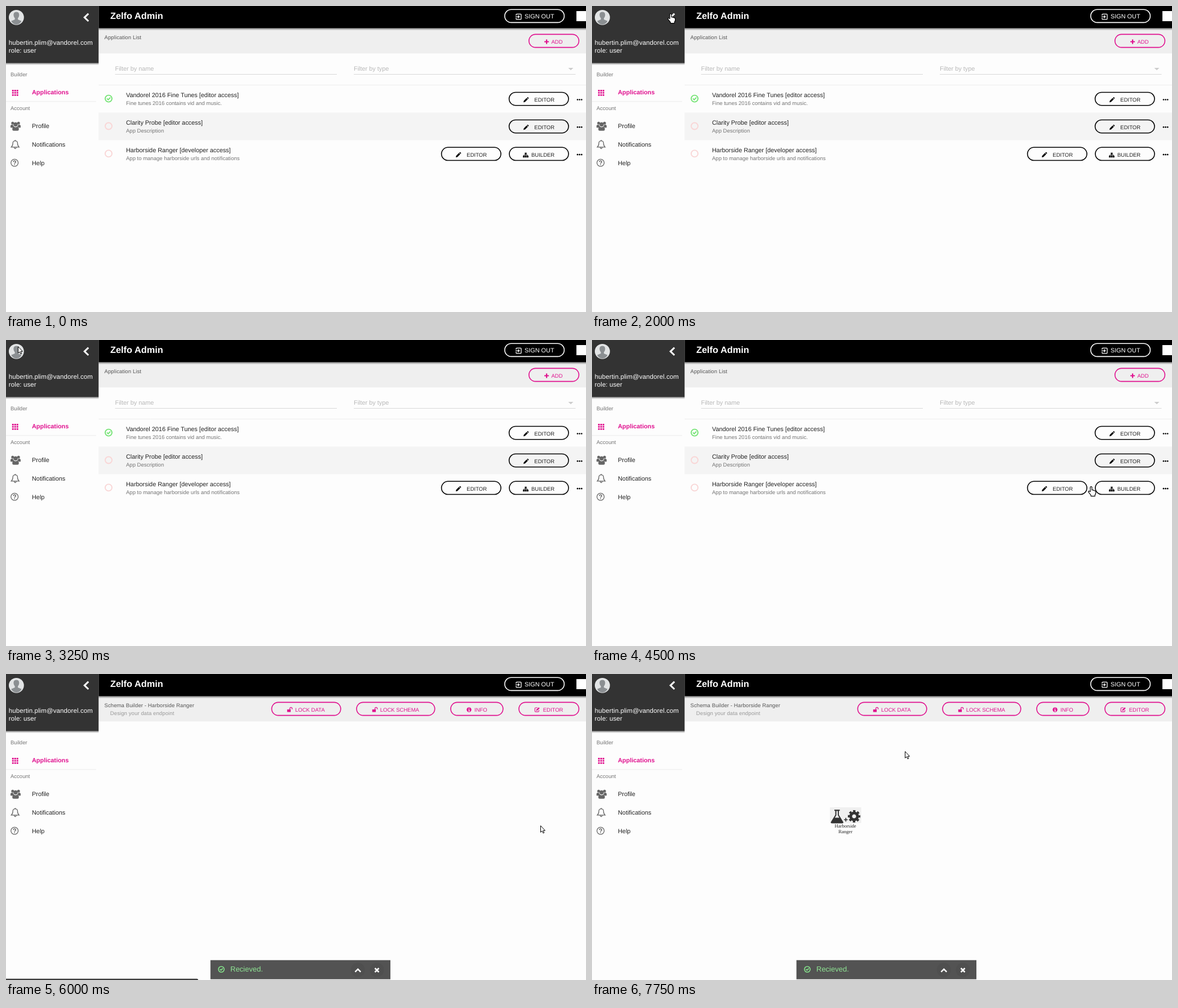
Animation of 1029x544 px, one loop 8000 ms. Source, as an HTML page:

```html
<!DOCTYPE html>
<html lang="en">
<head>
<meta charset="utf-8">
<title>Zelfo Admin</title>
<style>
html, body { margin: 0; width: 100%; height: 100%; overflow: hidden; background: #fdfdfd; }
svg { display: block; }
text { font-family: "Liberation Sans", Arial, sans-serif; font-size: 10.88px; fill: #222; text-rendering: geometricPrecision; }
.small { font-size: 9.52px; }
.spaced { letter-spacing: .1px; }
.muted { fill: #757575; }
.hint { fill: #b8b8b8; }
.bold { font-weight: bold; }
.pink text, text.pink { fill: #e0118f; }
.pill { fill: none; stroke: #000; stroke-width: 1.6; }
.pink .pill { stroke: #e0118f; }
.pink .ico { fill: #e0118f; }
.line { fill: none; stroke: currentColor; }

/* one step is 250 ms = 3.125% */
.t { animation: 8s step-end -15ms infinite; }
.open { animation-name: open; }
.shut { animation-name: shut; }
.title { animation-name: title; }
.shift { animation-name: shift; }
.list { animation-name: list; }
.schema { animation-name: schema; }
.node { animation-name: node; }
.status { animation-name: status; }
.ripple1 { animation-name: ripple1; }
.ripple2 { animation-name: ripple2; }
.cursor { animation-name: cursor; }
.hand { animation-name: hand; }
.arrow { animation-name: arrow; }

@keyframes open { 0%, 40.625%, 100% { opacity: 1 } 28.125% { opacity: 0 } }
@keyframes shut { 0%, 40.625%, 100% { opacity: 0 } 28.125% { opacity: 1 } }
@keyframes title { 0%, 40.625%, 100% { transform: none } 28.125% { transform: translateX(-154px) } }
@keyframes shift { 0%, 40.625%, 100% { transform: none } 28.125% { transform: translateX(-170.4px) } }
@keyframes list { 0%, 100% { opacity: 1 } 75% { opacity: 0 } }
@keyframes schema { 0%, 100% { opacity: 0 } 75% { opacity: 1 } }
@keyframes node { 0%, 100% { opacity: 0 } 78.125% { opacity: 1 } }
@keyframes status { 0%, 21.875%, 81.25%, 100% { opacity: 0 } 12.5%, 59.375% { opacity: 1 } }
@keyframes ripple1 {
  0%, 21.875%, 100% { transform: scale(0) }
  15.625% { transform: scale(.2) }
  18.75% { transform: scale(1) }
}
@keyframes ripple2 {
  0%, 75%, 100% { transform: scale(0) }
  68.75% { transform: scale(.21) }
  71.875% { transform: scale(1) }
}
@keyframes hand {
  0%, 21.875%, 31.25%, 40.625%, 75%, 100% { opacity: 0 }
  12.5%, 25%, 37.5%, 56.25% { opacity: 1 }
}
@keyframes arrow {
  0%, 12.5%, 25%, 37.5%, 56.25%, 100% { opacity: 0 }
  3.125%, 21.875%, 31.25%, 40.625%, 75% { opacity: 1 }
}
@keyframes cursor {
  0%, 3.125% { transform: translate(419px, 504px) }
  6.25% { transform: translate(194px, 266px) }
  9.375% { transform: translate(110px, 182px) }
  12.5% { transform: translate(68px, 144px) }
  21.875% { transform: translate(108px, 80px) }
  25% { transform: translate(138px, 13px) }
  34.375% { transform: translate(70px, 14px) }
  37.5% { transform: translate(21px, 11px) }
  46.875% { transform: translate(380px, 172px) }
  50% { transform: translate(547px, 238px) }
  53.125% { transform: translate(717px, 256px) }
  56.25% { transform: translate(884px, 260px) }
  59.375% { transform: translate(841px, 262px) }
  62.5% { transform: translate(951px, 268px) }
  75% { transform: translate(948px, 269px) }
  84.375% { transform: translate(930px, 240px) }
  87.5% { transform: translate(850px, 190px) }
  90.625% { transform: translate(740px, 160px) }
  93.75% { transform: translate(630px, 145px) }
  96.875%, 100% { transform: translate(555px, 137px) }
}
</style>
</head>
<body>
<svg width="1029" height="544" viewBox="0 0 1029 544">
<defs>
  <linearGradient id="shade" x2="0" y2="1">
    <stop offset="0" stop-color="#000" stop-opacity=".42"/>
    <stop offset="1" stop-color="#000" stop-opacity="0"/>
  </linearGradient>
  <clipPath id="navClip"><rect y="138" width="164" height="32.5"/></clipPath>
  <clipPath id="btnClip"><rect x="893" y="251" width="105" height="24" rx="12"/></clipPath>
  <g id="pencil"><path d="M-4.3 4.3l.7-2.9L1.3-3.5 3.5-1.3-1.4 3.6zM1.9-4.1l.8-.7q.6-.4 1.1.1l1 1q.5.6 0 1.1l-.7.7z"/></g>
  <g id="editor">
    <rect class="pill" x=".8" y=".8" width="105.4" height="23.2" rx="11.6"/>
    <use href="#pencil" x="30.5" y="14.3"/>
    <text class="small" x="45.5" y="17.3">EDITOR</text>
  </g>
  <g id="dots"><circle cx="-3.6" r="1.35"/><circle r="1.35"/><circle cx="3.6" r="1.35"/></g>
  <g id="check" fill="none" stroke="currentColor" stroke-width="1.9">
    <circle r="6"/><path d="M-3-.2L-.7 2 3.2-2"/>
  </g>
  <g id="unlock">
    <path d="M-4.5-.5h6.3v4.6h-6.3z"/>
    <path d="M.3-.5v-1.6a2 2 0 0 1 4 0v1.4" fill="none" stroke="#e0118f" stroke-width="1.3"/>
  </g>
  <path id="caret" d="M-4.5-2h9L0 2.3z" fill="#ccc"/>
</defs>

<rect width="1029" height="544" fill="#fdfdfd"/>
<rect y="39" width="1029" height="45.3" fill="#efefef"/>

<!-- application list -->
<g class="t list">
  <g class="t shift"><text class="small spaced" x="174.5" y="58.5" style="fill:#555">Application List</text></g>
  <g class="pink">
    <rect class="pill" x="927.8" y="50.4" width="88.6" height="23.2" rx="11.6"/>
    <path class="ico" d="M958 59.5h2.2v2.9h2.9v2.2h-2.9v2.9H958v-2.9h-2.9v-2.2h2.9z"/>
    <text class="small" x="967.5" y="66.6">ADD</text>
  </g>

  <g class="t open">
    <text class="hint" x="193.5" y="115">Filter by name</text>
    <text class="hint" x="617" y="115">Filter by type</text>
    <path d="M193.5 121.5H587M617 121.5h393.5" stroke="#d8d8d8"/>
    <use href="#caret" x="1002" y="112"/>
  </g>
  <g class="t shut" opacity="0">
    <text class="hint" x="29" y="115">Filter by name</text>
    <text class="hint" x="534.5" y="115">Filter by type</text>
    <path d="M29 121.5h471.5M534.5 121.5h472" stroke="#d8d8d8"/>
    <use href="#caret" x="996.5" y="112"/>
  </g>

  <path d="M0 140.5h1029" stroke="#ececec"/>
  <rect y="189.5" width="1029" height="49" fill="#f4f4f4"/>

  <g class="t shift">
    <use href="#check" x="182" y="164.6" color="#74e374"/>
    <g fill="none" stroke="#f9d6d6" stroke-width="1.9">
      <circle cx="182" cy="213.5" r="6"/><circle cx="182" cy="262.4" r="6"/>
    </g>
    <text x="213" y="162.3">Vandorel 2016 Fine Tunes [editor access]</text>
    <text class="small muted" x="213" y="176">Fine tunes 2016 contains vid and music.</text>
    <text x="213" y="211.3">Clarity Probe [editor access]</text>
    <text class="small muted" x="213" y="225">App Description</text>
    <text x="213" y="260.3">Harborside Ranger [developer access]</text>
    <text class="small muted" x="213" y="274">App to manage harborside urls and notifications</text>
  </g>

  <g clip-path="url(#btnClip)">
    <g transform="translate(948 270.5)"><circle class="t ripple2" r="43" fill="#cfcfcf" transform="scale(0)"/></g>
  </g>
  <use href="#editor" x="891.8" y="152.7"/>
  <use href="#editor" x="891.8" y="201.7"/>
  <use href="#editor" x="771.8" y="250.5"/>
  <rect class="pill" x="893" y="251.3" width="105" height="23.2" rx="11.6"/>
  <g transform="translate(922 265)">
    <path d="M-1.6-4.3h3.2v3h-3.2zM-4.9 1.2h3v3h-3zM-1.5 1.2h3v3h-3zM1.9 1.2h3v3h-3z"/>
    <path d="M0-2v3.4M-3.4 1.5V0h6.8v1.5" fill="none" stroke="#000" stroke-width=".9"/>
  </g>
  <text class="small" x="932" y="267.8">BUILDER</text>
  <use href="#dots" x="1017.6" y="166.5"/>
  <use href="#dots" x="1017.6" y="215.3"/>
  <use href="#dots" x="1017.6" y="264.2"/>
</g>

<!-- schema builder -->
<g class="t schema" opacity="0">
  <text class="small spaced" x="174.5" y="58.7" style="fill:#555">Schema Builder - Harborside Ranger</text>
  <text class="small spaced" x="184.8" y="73" style="fill:#999">Design your data endpoint</text>
  <g class="pink">
    <rect class="pill" x="471.4" y="50.4" width="122.4" height="23.2" rx="11.6"/>
    <rect class="pill" x="622" y="50.4" width="138.7" height="23.2" rx="11.6"/>
    <rect class="pill" x="789" y="50.4" width="92.8" height="23.2" rx="11.6"/>
    <rect class="pill" x="910" y="50.4" width="106.4" height="23.2" rx="11.6"/>
    <use class="ico" href="#unlock" x="503.3" y="63.5"/>
    <use class="ico" href="#unlock" x="654.3" y="63.5"/>
    <circle class="ico" cx="821.5" cy="63.5" r="4.2"/>
    <path d="M820.6 61h1.8M820.3 63.2h1.4v2.6M820.2 66h2.8" fill="none" stroke="#fff" stroke-width="1.1"/>
    <path d="M943 60h-3.3q-1.4 0-1.4 1.4v4.3q0 1.4 1.4 1.4h4.3q1.4 0 1.4-1.4V64" fill="none" stroke="#e0118f" stroke-width="1.1"/>
    <path class="ico" d="M940.5 65.3l.5-2 4.1-4.1 1.7 1.7-4.2 4.1z"/>
    <text class="small" x="513" y="66.6">LOCK DATA</text>
    <text class="small" x="663.7" y="66.6">LOCK SCHEMA</text>
    <text class="small" x="831" y="66.6">INFO</text>
    <text class="small" x="952.7" y="66.6">EDITOR</text>
  </g>

  <g class="t node" opacity="0">
    <rect x="422" y="237" width="55.5" height="28" fill="#f0f0f0"/>
    <path d="M430 241.2h9.6v2H438v7.2l7.4 12q1.6 3-1.6 3h-18q-3.2 0-1.6-3l7.4-12v-7.2H430z" fill="#333"/>
    <path d="M433.6 243.4h2.5v7.6l2.8 4.6h-8.1l2.8-4.6z" fill="#f0f0f0"/>
    <path d="M447 259h6.6M450.3 255.7v6.6" stroke="#333" stroke-width="1.7"/>
    <g fill="none" stroke="#333" transform="translate(465 253)">
      <circle r="6.1" stroke-width="5"/>
      <circle r="9.3" stroke-width="3.6" stroke-dasharray="4.1 3.204" stroke-dashoffset="2.05"/>
    </g>
    <g text-anchor="middle">
      <text x="449.6" y="273.3" style="font:8.6px 'Liberation Serif',serif">Harborside</text>
      <text x="449.6" y="283.3" style="font:8.6px 'Liberation Serif',serif">Ranger</text>
    </g>
  </g>

  <rect x="362.7" y="508.7" width="319.3" height="34" fill="#535353"/>
  <g transform="translate(382 525) scale(.84)"><use href="#check" color="#86e58c"/></g>
  <text x="398" y="529.3" style="font-size:13px;fill:#8fe594">Recieved.</text>
  <circle cx="624.3" cy="526" r="12.5" fill="#4f4f4f"/>
  <circle cx="658" cy="526" r="12.5" fill="#4f4f4f"/>
  <path d="M619.4 529.6l4.9-4.9 4.9 4.9M654.5 523l7 7M661.5 523l-7 7" fill="none" stroke="#fff" stroke-width="2.5"/>
</g>

<!-- top bar -->
<rect width="1029" height="39.5" fill="#000"/>
<rect y="39.5" width="1029" height="4" fill="url(#shade)"/>
<g class="t title"><text class="bold" x="185" y="23.3" style="font-size:16.32px;fill:#fff">Zelfo Admin</text></g>
<g class="t shut" opacity="0"><path d="M6 12.7h16M6 18.3h16M6 23.9h16" stroke="#fff" stroke-width="2.3"/></g>
<rect x="884.8" y="6.2" width="105.6" height="23.2" rx="11.6" fill="none" stroke="#fff" stroke-width="1.6"/>
<path d="M905 17v-1.6q0-1 1-1h7q1 0 1 1v7.4q0 1-1 1h-7q-1 0-1-1V21M903.8 19.1h6.5M908.2 16.6l2.5 2.5-2.5 2.5" fill="none" stroke="#fff" stroke-width="1.3"/>
<text x="920" y="22.4" style="fill:#fff">SIGN OUT</text>
<rect x="1012" y="9" width="17" height="18" fill="#fff"/>

<!-- sidebar -->
<g class="t open">
  <rect width="164.3" height="544" fill="#fdfdfd"/>
  <rect width="164.3" height="101.5" fill="#333"/>
  <rect y="101.5" width="164.3" height="3.5" fill="url(#shade)"/>
  <circle cx="18.4" cy="20.3" r="13.4" fill="#e2e4e5"/>
  <path d="M18.4 10.5c3.8 0 5.2 2.8 4.9 6-.2 2.6-1.4 4.3-2.2 5.2v2.2l6.5 2.9c-1.8 3.7-5.2 6.2-9.2 6.2s-7.4-2.5-9.2-6.2l6.5-2.9v-2.2c-.8-.9-2-2.6-2.2-5.2-.3-3.2 1.1-6 4.9-6z" fill="#8b8f92"/>
  <path d="M146.2 13.6l-6.9 6.7 6.9 6.7" fill="none" stroke="#fff" stroke-width="3.1"/>
  <text x="4.8" y="69" style="font-size:11.5px;letter-spacing:.1px;fill:#fff">hubertin.plim@vandorel.com</text>
  <text x="4.8" y="83.4" style="font-size:11.5px;letter-spacing:.1px;fill:#fff">role: user</text>

  <text class="small muted" x="8" y="125">Builder</text>
  <g clip-path="url(#navClip)">
    <g transform="translate(64.5 154)"><circle class="t ripple1" r="43.7" fill="#d2d2d2" transform="scale(0)"/></g>
  </g>
  <path d="M10.8 150.5h11M10.8 154.4h11M10.8 158.3h11" stroke="#e0118f" stroke-width="2.8" stroke-dasharray="2.9 1.1"/>
  <text class="bold pink" x="46" y="157.4">Applications</text>
  <path d="M0 169.8h160" stroke="#ececec"/>
  <text class="small muted" x="8" y="185">Account</text>

  <g fill="#666">
    <circle cx="11.8" cy="208.2" r="2.5"/><circle cx="22.2" cy="208.2" r="2.5"/><circle cx="17" cy="210.5" r="3.7"/>
    <path d="M8 216.3v-2.6q0-2.6 2.3-2.6l2.6.6q.3 2 1.4 3-1.6.3-2.5 1.6zM26 216.3v-2.6q0-2.6-2.3-2.6l-2.6.6q-.3 2-1.4 3 1.6.3 2.5 1.6zM11.2 219.5q0-4.9 3-4.9 2.8 1.8 5.6 0 3 0 3 4.9 0 2.3-2.4 2.3h-6.8q-2.4 0-2.4-2.3z"/>
  </g>
  <g fill="none" stroke="#666" stroke-width="1.3">
    <path d="M9.5 250.8q2.7-2.4 2.7-7.2 0-3.6 4.1-4 4.100.4 4.100 4 0 4.800 2.700 7.200zM16.300 238v1.500M14.500 251.500q.3 2 1.800 2t1.800-2"/>
    <circle cx="15.200" cy="278.800" r="6.400"/>
    <path d="M13.100 277.300q.1-2.100 2.100-2.100t2.100 1.800q0 1-1.100 1.600t-1 1.700M15.200 281.300v1.500" stroke-width="1.500"/>
  </g>
  <text x="46" y="217.200">Profile</text>
  <text x="46" y="249.900">Notifications</text>
  <text x="46" y="282.500">Help</text>
</g>

<path class="t status" opacity="0" d="M0 541.700h338.500q2.500 0 2.500 2.300H0z" fill="#3a3a3a"/>

<g class="t cursor" stroke="#000" fill="#fff" stroke-linejoin="round">
  <path class="t hand" opacity="0" d="M0 9.700V2.100a1.500 1.500 0 0 1 3 0V6.800q1.900-.9 2.400.6 1.800-.7 2.300.7 1.800-.4 2 1.500v3.300l-1.400 2.700v2.100H1.200v-1.900L-3 10.700q-.9-1.500.4-2.100 1-.3 1.700.5z" stroke-width="1.200"/>
  <path class="t arrow" opacity="0" d="M.5.700V12.400l2.600-2.400 1.900 4 1.800-.8-1.800-3.900h3.500z" stroke-width="1"/>
</g>
</svg>
</body>
</html>
```
